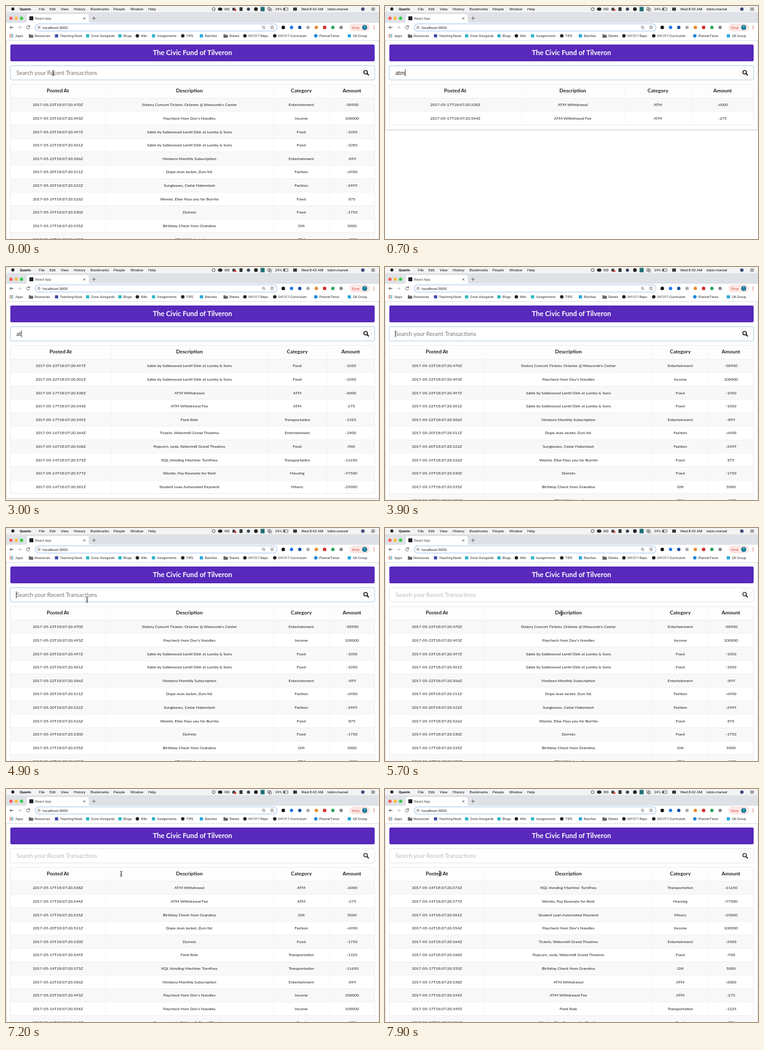
Recreate the animation shown at these times as an HTML page. Size 600 by 375 pixels, loop 8000 ms.

```html
<!DOCTYPE html>
<html lang="en">
<head>
<meta charset="utf-8">
<title>Transactions</title>
<style>
  html, body { margin: 0; width: 100%; height: 100%; overflow: hidden; background: #fff; }
  svg { display: block; width: 600px; height: 375px; }
  text { white-space: pre; }
  .ui { font-family: Roboto, Inter, sans-serif; }
  .page { font-family: Lato, sans-serif; }
</style>
</head>
<body>
<svg viewBox="0 0 600 375">
  <g class="page">
    <g id="table"></g>
    <g id="search"></g>
    <g id="banner"></g>
  </g>
  <g id="browser" class="ui"></g>
  <path id="caret" d="M0 102v11" stroke="#222" stroke-width=".8"/>
  <path id="mouse" d="M-1.8-4Q0-4 0-2.8Q0-4 1.8-4M0-3V3M-1.8 4Q0 4 0 2.8Q0 4 1.8 4M-1 .8H1" fill="none" stroke="#222" stroke-width=".9"/>
</svg>
<script>
const $ = id => document.getElementById(id);
const esc = s => String(s).replace(/&/g, '&amp;');
const text = (x, y, s, size, fill = '#333', extra = '') =>
  `<text x="${x}" y="${y}" font-size="${size}" fill="${fill}" ${extra}>${esc(s)}</text>`;
const mid = ' text-anchor="middle"';
const bold = ' font-weight="700"';
const rect = (x, y, w, h, fill, r = 0, extra = '') =>
  `<rect x="${x}" y="${y}" width="${w}" height="${h}" fill="${fill}" rx="${r}" ${extra}/>`;
const dot = (x, y, r, fill, extra = '') => `<circle cx="${x}" cy="${y}" r="${r}" fill="${fill}" ${extra}/>`;
const line = (d, color, w = 1) =>
  `<path d="${d}" fill="none" stroke="${color}" stroke-width="${w}" stroke-linecap="round"/>`;
const outline = (color, w = 1) => `stroke="${color}" stroke-width="${w}"`;

function menuBar() {
  const items = [['File', 53], ['Edit', 70], ['View', 88], ['History', 109], ['Bookmarks', 136],
    ['People', 173], ['Window', 200], ['Help', 229]];
  return rect(0, 0, 600, 10, '#f3f3f3') + dot(11, 4.8, 2.5, '#222') +
    text(22, 7, 'Quorin', 6, '#111', bold) +
    items.map(([s, x]) => text(x, 7, s, 5.9, '#111')).join('') +
    dot(334, 5, 2.4, 'none', outline('#333', .8)) + rect(341, 2.5, 7, 5, '#222', 2.5) +
    dot(353.5, 5, 1.6, 'none', outline('#333', .8)) + dot(357.5, 5, 1.6, 'none', outline('#333', .8)) +
    dot(366.5, 5, 2.6, '#444') + dot(369, 6.6, 1.6, '#e33') +
    rect(375.5, 2, 5, 6, '#2d3a33', 1) + dot(390, 5, 2.6, '#345') +
    dot(402, 5, 3, '#222') + rect(409.5, 1.5, 6.5, 7, '#1d6f74') +
    rect(421, 2.5, 4, 4, 'none', .5, outline('#444', .7)) + rect(423, 4, 4, 4, 'none', .5, outline('#444', .7)) +
    text(433, 7, '24%', 5.8, '#111') + rect(446, 3, 7.5, 4, 'none', .8, outline('#222', .6)) +
    rect(446.7, 3.7, 2, 2.6, '#222') + rect(462, 2.5, 6, 5, '#333', .5) +
    text(475, 7, 'Wed 8:42 AM', 6, '#111') + text(517, 7, 'tobin.marsel', 6, '#111') +
    dot(574, 5, 2.8, '#3d4a78') + line('M588 3.2h5M588 5h5M588 6.8h5', '#222', .7);
}

function tabs() {
  return rect(0, 10, 600, 17, '#dee1e6') +
    ['#fc5b57', '#fdbc40', '#34c84a'].map((c, i) => dot(8 + 8.5 * i, 19.7, 2.6, c)).join('') +
    '<path d="M31 27Q33.5 27 33.5 24V16Q33.5 13 36.5 13H130Q133 13 133 16V24Q133 27 135.5 27Z" fill="#fff"/>' +
    rect(37.5, 16.5, 6.5, 6.5, '#20232a', 1) + text(47, 22, 'React App', 5.6, '#444') +
    line('M124.5 18.5l3 3m0-3l-3 3M139 19.8h5m-2.5-2.5v5', '#555', .8);
}

function toolbar() {
  const tools = ['#111', '#2477e8', '#1c50a0', '#aaa', '#e58a2e', '#d22e2e', '#29a35a', '#888'];
  return rect(0, 27, 600, 28, '#fff') +
    line('M11.5 34.5h-5m2-2l-2 2l2 2', '#444', .9) + line('M19.5 34.5h5m-2-2l2 2l-2 2', '#bbb', .9) +
    line('M37.8 33a2.6 2.6 0 1 0 .2 2.6M38 31.5v1.8h-1.8', '#444', .8) +
    rect(47, 28.7, 389, 11.6, '#fff', 5.8, outline('#a9c7f1', 1.1)) +
    dot(53, 34.5, 2, 'none', outline('#555', .6)) + line('M53 34.5v1M53 33.4v.1', '#555', .6) +
    text(59, 36.6, 'localhost:3000', 6.1, '#222') +
    dot(414, 34, 1.7, 'none', outline('#555', .7)) + line('M415.3 35.4l1.4 1.4', '#555', .7) +
    line('M428 31.7l.8 1.9 2 .1-1.5 1.3.5 2-1.8-1.1-1.8 1.1.5-2-1.5-1.3 2-.1z', '#555', .6) +
    tools.map((c, i) => i % 5 ? dot(446 + 13.3 * i, 34.5, 2.7, c) : rect(443.3 + 13.3 * i, 31.8, 5.4, 5.4, c, 2)).join('') +
    rect(553, 29, 32, 11, '#fce8e6', 5.5, outline('#f3c3bf', .5)) + text(557, 36.6, 'Error', 5.6, '#d23f31') +
    dot(577, 34.5, 4, '#167a9a') + text(577, 36.1, 'T', 4.5, '#fff', mid) +
    [32.3, 34.5, 36.7].map(y => dot(592, y, .7, '#d23f31')).join('');
}

function bookmarks() {
  const teal = '#27b6c4', blue = '#22a7e0', ink = '#222';
  const links = [['Resources', 46], ['Teaching Nook', 87, '#3949ab'], ['Grow Alongside', 137, teal],
    ['Blogs', 189, teal], ['Wiki', 217, ink, 1], ['Assignments', 243, teal], ['TIPS', 290, ink, 1],
    ['Batches', 320, blue], ['Sheets', 359], ['041317-Repo', 390, ink, 1], ['041317-Curriculum', 438, ink, 1],
    ['PlannerTwice', 504, '#1c86d8', 1], ['QK Group', 558, blue]];
  let out = text(15, 50, 'Apps', 5.35);
  for (let i = 0; i < 9; i++)
    out += rect(6 + 2 * (i % 3), 45.2 + 2 * (i / 3 | 0), 1.4, 1.4, ['#e44', '#4a6', '#48e'][i % 3]);
  for (const [s, x, color, round] of links) {
    const cx = x - 5.7;
    out += text(x, 50, s, 5.35);
    if (!color) out += `<path d="M${cx - 3.5} 45.5h2.5l1 1h3.5v4.5h-7z" fill="#666"/>`;
    else out += round ? dot(cx, 48, 2.8, color) : rect(cx - 2.6, 45.4, 5.2, 5.2, color, .6);
  }
  return out + rect(0, 55, 600, .7, '#d5d5d5');
}

$('browser').innerHTML = menuBar() + tabs() + toolbar() + bookmarks();
$('banner').innerHTML = rect(7, 62, 586, 27, '#5829bb', 2) +
  text(300, 79.3, 'The Civic Fund of Tilveron', 11, '#fff', mid + bold);

// day.millis | description | category | amount
const rows = `23.470|Stalory Concert Tickets: Orlanne @ Wexcomb's Center|Entertainment|-58900
23.493|Paycheck from Dov's Noodles|Income|100000
23.497|Sable by Sablewood Lentil Dish at Lumby & Sons|Food|-1050
22.501|Sable by Sablewood Lentil Dish at Lumby & Sons|Food|-1050
22.506|Nimbora Monthly Subscription|Entertainment|-899
20.511|Dope Jean Jacket, Zum ltd.|Fashion|-6900
20.522|Sunglasses, Cedar Haberdash|Fashion|-2499
19.526|Womlo, Elise Pays you for Burrito|Food|875
19.530|Dorrelo|Food|-1750
17.535|Birthday Check from Grandma|Gift|5000
17.538|ATM Withdrawal|ATM|-6000
17.544|ATM Withdrawal Fee|ATM|-275
17.549|Fenk Ride|Transportation|-1325
16.554|Paycheck from Dov's Noodles|Income|100000
16.564|Tickets, Watermill Grand Theatres|Entertainment|-2400
16.568|Popcorn, soda, Watermill Grand Theatres|Food|-900
14.573|KQL Vending Machine: TurnPass|Transportation|-11650
14.577|Womlo, Pay Roomate for Rent|Housing|-97500
14.581|Student Loan Automated Payment|Misery|-25000`.split('\n').map(r => {
  const [stamp, ...rest] = r.split('|');
  const [day, ms] = stamp.split('.');
  return [`2017-05-${day}T18:07:20.${ms}Z`, ...rest];
});
const by = (col, sign) => list => [...list].sort((a, b) =>
  sign * ((a[col] > b[col]) - (a[col] < b[col])));
const sorts = { none: list => list, nameDown: by(1, -1), nameUp: by(1, 1), dateUp: by(0, 1) };
const wide = [7, 160, 430, 520, 593];
const edges = { at: [7, 169, 421, 516, 593], atm: [7, 219, 385, 493, 593] };

function drawTable(query, order) {
  const cols = edges[query] || wide, top = 126, head = 148, pitch = 21.65;
  const center = i => (cols[i] + cols[i + 1]) / 2;
  const found = sorts[order](rows.filter(r => (r[1] + '|' + r[2]).toLowerCase().includes(query)));
  const bottom = head + found.length * pitch;
  let out = rect(-1, bottom + 8.3, 602, 1.2, '#e9e9e9') +
    rect(.3, 50, 599.4, bottom - 42.2, '#fff', 2, outline('#cfcfd0', .8)) +
    rect(7, top, 586, head - top, '#fdfdfd', 2);
  found.forEach((r, n) => {
    const y = head + n * pitch;
    out += rect(7, y, 586, pitch, n % 2 ? '#fff' : '#f8f8f9') + rect(7, y, 586, .5, '#e4e4e5');
    r.forEach((s, i) => out += text(center(i), y + 13.2, s, 6.45, '#222', mid));
  });
  ['Posted At', 'Description', 'Category', 'Amount'].forEach((s, i) => {
    out += text(center(i), 139.3, s, 8.3, '#222', mid + bold);
    if (i) out += rect(cols[i], top, .5, bottom - top, '#eeeeef');
  });
  $('table').innerHTML = out + rect(7, top, 586, bottom - top, 'none', 2, outline('#dededf', .6));
}

function drawSearch(query, focused) {
  const ink = focused ? '#111' : '#333';
  $('search').innerHTML =
    rect(7, 96, 586, 23, '#fff', 2, outline(focused ? '#9dbfdc' : '#dededf', .8)) +
    text(16.7, 110.7, query || 'Search your Recent Transactions', 9.2,
      query ? '#222' : focused ? '#777' : '#bbb', 'id="typed"') +
    dot(579.5, 107.5, 8.8, '#fff', outline('#dcdcdc', .6)) +
    dot(578.5, 106.5, 2.9, 'none', outline(ink, 1.4)) +
    line('M580.9 108.9l2.2 2.2', ink, 1.8);
}

const typing = [[0, ''], [300, 'a'], [500, 'at'], [600, 'atm'], [2900, 'at'], [3400, 'a'], [3800, '']];
const clicks = [[0, 'none'], [5900, 'nameDown'], [6900, 'nameUp'], [7600, 'dateUp']];
const path = [[0, 76, 108], [4700, 76, 108], [5300, 284, 137], [7000, 284, 137], [7400, 88, 136], [8000, 88, 136]];
const latest = (steps, t) => steps.filter(s => s[0] <= t).pop();

function mouseAt(t) {
  const i = path.findIndex(p => p[0] > t);
  const [t0, x0, y0] = path[i - 1], [t1, x1, y1] = path[i];
  const k = (t - t0) / (t1 - t0), e = k * k * (3 - 2 * k);
  return [x0 + (x1 - x0) * e, y0 + (y1 - y0) * e];
}

let shown;
function draw() {
  const t = performance.now() % 8000;
  const [typedAt, query] = latest(typing, t), order = latest(clicks, t)[1];
  const focused = t < 5600;
  const key = [query, order, focused].join();
  if (key !== shown) {
    drawTable(query, order);
    drawSearch(query, focused);
    shown = key;
  }
  const caretOn = focused && t >= 300 && (t - typedAt) % 1000 < 500;
  const caretX = query ? 17.2 + $('typed').getComputedTextLength() : 16.5;
  $('caret').setAttribute('transform', `translate(${caretX})`);
  $('caret').setAttribute('opacity', +caretOn);
  $('mouse').setAttribute('transform', `translate(${mouseAt(t)})`);
  $('mouse').setAttribute('opacity', +(t < 300 || t >= 4700));
  requestAnimationFrame(draw);
}
draw();
</script>
</body>
</html>
```
